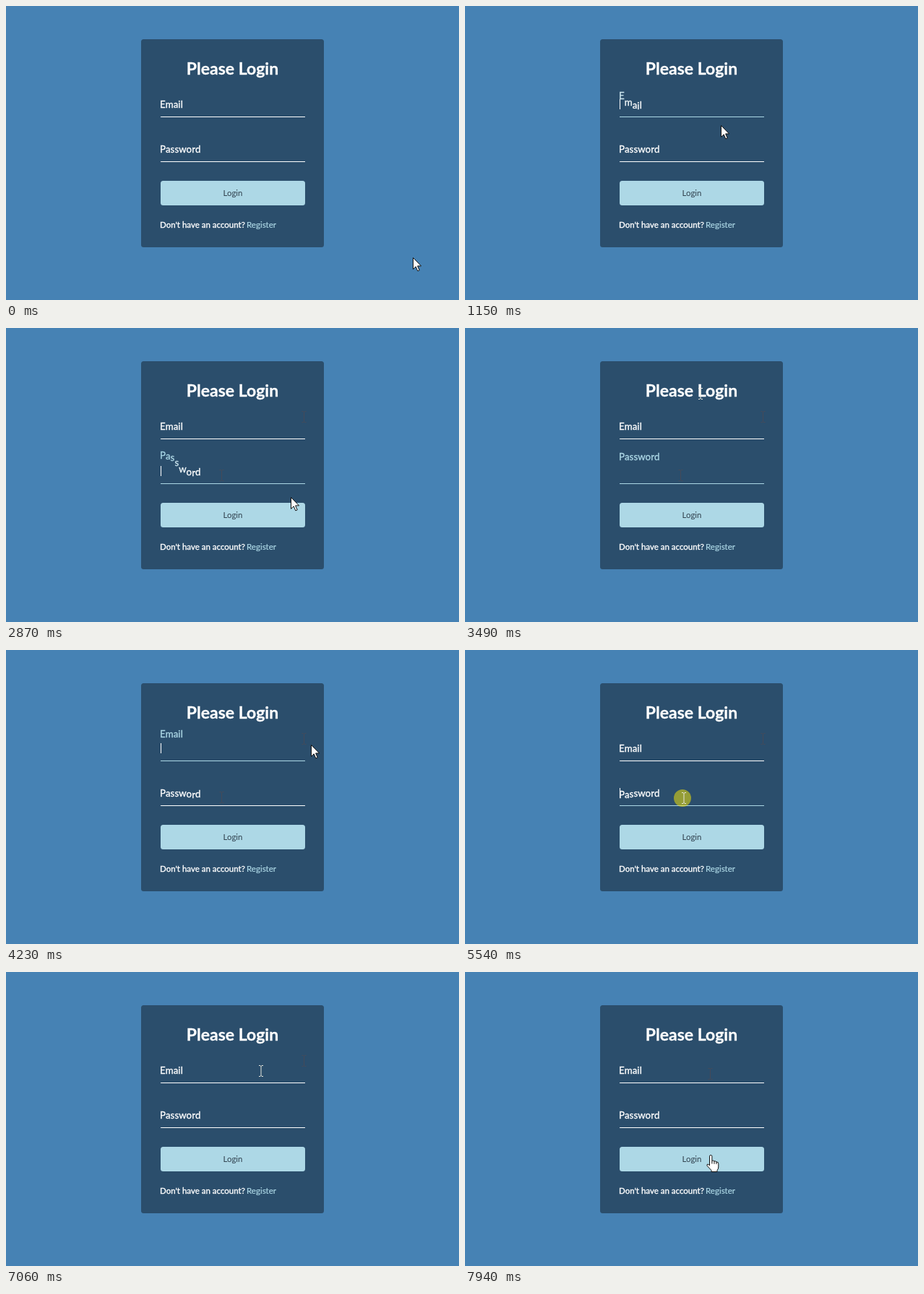
These frames come from a looping animation (627 px wide and 407 px high, 8000 ms). An HTML page:

```html
<!DOCTYPE html>
<html lang="en">
<head>
<meta charset="utf-8">
<title>Login form</title>
<style>
  html, body { margin: 0; width: 627px; height: 407px; overflow: hidden; background: #4682b4; }
  body { position: relative; font-family: Lato, "Open Sans", sans-serif; color: #fff; }
  body > * { position: absolute; margin: 0; white-space: nowrap; }
  .card { left: 187px; top: 46px; width: 253px; height: 288px; border-radius: 3.5px; background: #2b4e6c; }
  h1 { left: 187px; width: 253px; top: 72px; text-align: center; font: 700 23px/28px Lato, sans-serif; -webkit-text-stroke: .3px; }
  .line { left: 214px; width: 200px; height: 1px; background: #fff; }
  .label { left: 213px; font-size: 13.3px; line-height: 16px; -webkit-text-stroke: .35px; }
  .label span { display: inline-block; min-width: 3.4px; }
  .caret { left: 214px; width: 1px; height: 14px; background: #fff; }
  .button { left: 214px; top: 242px; width: 200px; height: 34px; border-radius: 3.5px;
    background: #add8e6; color: #2f3f4c; text-align: center; font-size: 11.4px; line-height: 34px; }
  .note { top: 296px; font-size: 11.5px; line-height: 14px; }
  .ask { left: 213px; -webkit-text-stroke: .35px; }
  .link { left: 333px; color: #add8e6; -webkit-text-stroke: .2px; }
  svg { left: 0; top: 0; }
</style>
</head>
<body>
<div class="card"></div>
<h1>Please Login</h1>
<div class="button">Login</div>
<div class="note ask">Don't have an account?</div>
<div class="note link">Register</div>
<svg id="stage" width="627" height="407" fill="none">
  <defs>
    <path id="beam" d="M-3 -7.5H-1L0 -6.5L1 -7.5H3M0 -7V7M-3 7.5H-1L0 6.5L1 7.5H3"/>
  </defs>
  <!-- Marks the pointer and caret leave behind -->
  <g id="traces" stroke="#4b4a55">
    <path data-from="1770" data-to="2240" d="M214.5 119V153" stroke="#fff"/>
    <use data-from="1830" data-to="7150" href="#beam" x="412.5" y="123" opacity=".8"/>
    <use data-from="2660" data-to="5470" href="#beam" x="298.5" y="204" opacity=".8"/>
    <use data-from="7300" data-to="8000" href="#beam" x="339.5" y="141" opacity=".8"/>
  </g>
  <circle id="click" r="12" fill="#ffec00" fill-opacity=".5"/>
  <g id="pointer">
    <path data-kind="arrow" d="M.5 .5V16.3L4.2 12.8L6.8 18.8L9.2 17.8L6.6 11.9H11.6Z" fill="#fff" stroke="#111"/>
    <use data-kind="beam" href="#beam" stroke="#e6e6dc"/>
    <path data-kind="hand" d="M-1.5 14V1.2A1.7 1.7 0 0 1 1.9 1.2V7.5Q3.6 6.2 5 8Q7 7.2 8 9Q10.8 8.6 10.8 11.5V16Q10.8 18.5 9 20.5V22.5H1V20.5L-5 14.2Q-5.6 11.4 -3 12.3ZM1.9 7.5V11.5M5 8V11.8M8 9V12" fill="#fff" stroke="#111"/>
  </g>
</svg>
<script>
const LOOP = 8000, RISE = 20, WAVE = 300, STAGGER = 30, BLINK = 530, FLASH = 110;
const $ = id => document.getElementById(id);
const show = (el, on) => { el.style.visibility = on ? 'visible' : 'hidden'; };
const inside = (x, y, l, t, r, b) => x >= l && x <= r && y >= t && y <= b;

// Key stops of the pointer; those marked true end in a click
const stops = [
  [70, 563, 348], [750, 286, 136], [1000, 286, 136, true],
  [1500, 597, 268], [1770, 402, 105, true], [2040, 356, 105],
  [2590, 299, 204], [2630, 299, 204, true], [3020, 440, 249], [3490, 326, 91],
  [3810, 340, 130, true], [4230, 422, 131], [4460, 380, 71, true],
  [4800, 325, 198], [5060, 332, 81], [5130, 332, 81],
  [5340, 301, 205], [5470, 301, 205, true], [5540, 303, 205],
  [5800, 473, 208], [6180, 351, 77, true], [6230, 346, 86],
  [6750, 440, 110], [7150, 340, 141, true], [7400, 455, 71, true], [7940, 340, 254]
].map(([time, x, y, click]) => ({ time, x, y, click }));
const clicks = stops.filter(s => s.click);

const fields = [{ text: 'Email', top: 128 }, { text: 'Password', top: 190 }];
const over = (f, { x, y }) => inside(x, y, 214, f.top - 9, 414, f.top + 26);

function add(cls, top) {
  const el = document.createElement('div');
  el.className = cls;
  el.style.top = top + 'px';
  document.body.insertBefore(el, $('stage'));
  return el;
}

for (const f of fields) {
  f.line = add('line', f.top + 25);
  f.label = add('label', f.top);
  f.caret = add('caret', f.top + 1);
  f.letters = [...f.text].map(ch => {
    const s = document.createElement('span');
    s.textContent = ch;
    return f.label.appendChild(s);
  });
}

// cubic-bezier(.68, -.55, .265, 1.55)
function backEase(x) {
  if (x <= 0) return 0;
  if (x >= 1) return 1;
  const curve = (s, a, b) => 3 * (1 - s) ** 2 * s * a + 3 * (1 - s) * s * s * b + s ** 3;
  let lo = 0, hi = 1;
  for (let i = 0; i < 20; i++) {
    const mid = (lo + hi) / 2;
    if (curve(mid, .68, .265) < x) lo = mid; else hi = mid;
  }
  return curve(lo, -.55, 1.55);
}

function pointerAt(t) {
  const k = stops.findIndex(s => s.time > t);
  if (k === 0) return stops[0];
  if (k < 0) return stops[stops.length - 1];
  const a = stops[k - 1], b = stops[k];
  const u = (t - a.time) / (b.time - a.time);
  const e = u * u * (3 - 2 * u);
  return { x: Math.round(a.x + (b.x - a.x) * e), y: Math.round(a.y + (b.y - a.y) * e) };
}

function pointerKind(p) {
  if (inside(p.x, p.y, 214, 242, 414, 276)) return 'hand';
  const text = inside(p.x, p.y, 250, 74, 377, 101) || fields.some(f => over(f, p));
  return text ? 'beam' : 'arrow';
}

// A click focuses the field under it and blurs the other
function drawField(f, t, last) {
  const focused = last && over(f, last);
  f.line.style.background = focused ? '#add8e6' : '#fff';
  show(f.caret, focused && (t - last.time) % (2 * BLINK) < BLINK);
  f.letters.forEach((el, i) => {
    const up = clicks.reduce((y, c) =>
      y + (over(f, c) - y) * backEase((t - c.time - STAGGER * i) / WAVE), 0);
    el.style.transform = `translateY(${-RISE * up}px)`;
    el.style.color = `rgb(${255 - 82 * up}, ${255 - 39 * up}, ${255 - 25 * up})`;
  });
}

function draw(t) {
  const last = clicks.filter(c => c.time <= t).pop();
  fields.forEach(f => drawField(f, t, last));

  const p = pointerAt(t), kind = pointerKind(p);
  $('pointer').setAttribute('transform', `translate(${p.x} ${p.y})`);
  for (const el of $('pointer').children) show(el, el.dataset.kind === kind);

  const flash = last && t < last.time + FLASH;
  show($('click'), flash);
  if (flash) $('click').setAttribute('transform', `translate(${last.x} ${last.y})`);

  for (const el of $('traces').children) show(el, t >= +el.dataset.from && t < +el.dataset.to);
}

const start = performance.now();
function tick() {
  draw((performance.now() - start) % LOOP);
  requestAnimationFrame(tick);
}
tick();
</script>
</body>
</html>
```
